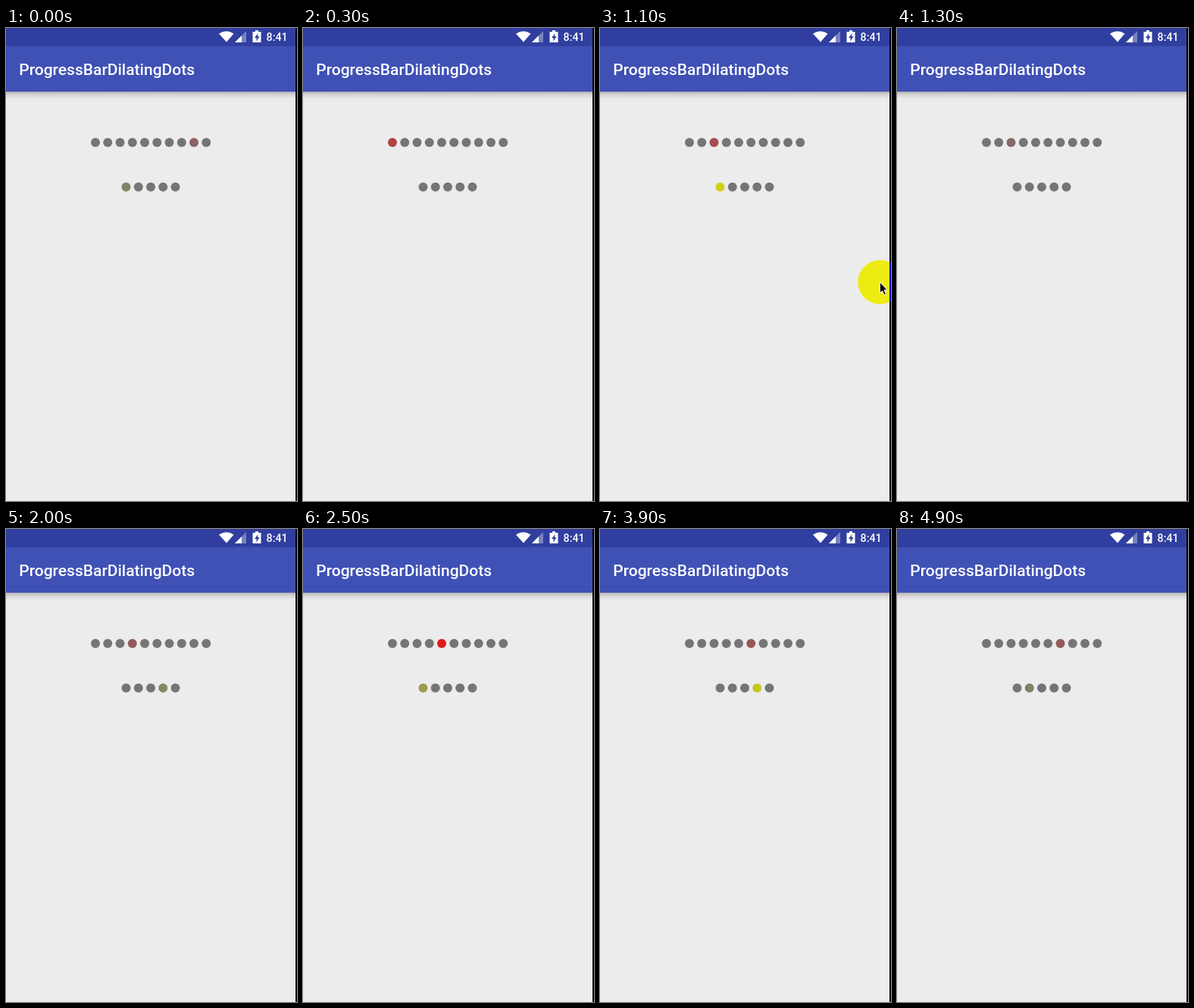
An HTML page that plays this animation: 384x624 px, repeating every 5000 ms.

```html
<!DOCTYPE html>
<html lang="en">
<head>
<meta charset="utf-8">
<title>Dilating dots</title>
<style>
  html, body { margin: 0; width: 100%; height: 100%; overflow: hidden; background: #ececec; }
  svg { display: block; }
  text { font-family: Roboto, sans-serif; font-weight: 500; fill: #fff; }
  #halo { mix-blend-mode: difference; }
</style>
</head>
<body>
<svg width="384" height="624" viewBox="0 0 384 624">
  <defs>
    <linearGradient id="shade" x2="0" y2="1">
      <stop offset="0" stop-opacity=".24"/>
      <stop offset=".4" stop-opacity=".1"/>
      <stop offset="1" stop-opacity="0"/>
    </linearGradient>
  </defs>
  <rect width="384" height="624" fill="#ececec"/>
  <rect y="84" width="384" height="10" fill="url(#shade)"/>
  <rect width="384" height="84" fill="#3f51b5"/>
  <rect width="384" height="24" fill="#303f9f"/>
  <text x="17.3" y="62" font-size="21">ProgressBarDilatingDots</text>
  <text x="343.6" y="17" font-size="14.2">8:41</text>
  <g fill="#fff">
    <path d="M281 7.5Q291 .8 300.5 7.5L291 18.5Z"/>
    <path d="M317 4V19H302Z" opacity=".35"/>
    <path d="M311 10V19H302Z"/>
    <path d="M329 3h4v2h3.5v14h-11V5H329Z"/>
  </g>
  <path d="M332.5 7L328 13h2.5v4.5l4-6.5h-2.5Z" fill="#303f9f"/>
  <g id="dots"></g>
  <rect x="382" width="2" height="624"/>
  <circle id="halo" r="29" fill="#00f"/>
  <path id="arrow" d="M0 0V14.5L3.3 11.5L5.8 17L8.2 16L5.8 10.5H10Z" stroke="#fff"/>
</svg>
<script>
const LOOP = 5, FPS = 10, GRAY = [117, 117, 117];
const $ = id => document.getElementById(id);

// place(t): whole part is the lit dot, fraction is how far it has faded.
const rows = [
  { count: 10, x: 118, y: 151, color: [255, 0, 0],
    // a quick start that settles to a steady pace
    place: t => 11.62 + 1.02 * t - 2.92 * Math.exp(-2.24 * t) },
  { count: 5, x: 158.5, y: 209.7, color: [232, 232, 0],
    // a steady pace with one lull
    place: t => 0.75 + 4 * t - 3.6 / (1 + Math.exp(-3.3 * (t - 3.31))) }
];

for (const row of rows) {
  row.dots = Array.from({ length: row.count }, (_, i) => {
    const dot = document.createElementNS("http://www.w3.org/2000/svg", "circle");
    dot.setAttribute("cx", row.x + i * 16.25);
    dot.setAttribute("cy", row.y);
    dot.setAttribute("r", 6);
    return $("dots").appendChild(dot);
  });
}

function drawRow({ dots, count, color, place }, t) {
  const p = place(t), lit = Math.floor(p);
  const glow = (1 - p + lit) ** 1.5;
  dots.forEach((dot, i) => {
    const tint = i === lit % count ? glow : 0;
    const rgb = GRAY.map((g, c) => Math.round(g + (color[c] - g) * tint));
    dot.setAttribute("fill", `rgb(${rgb})`);
  });
}

// The pointer swings in at the right edge and drops away again.
function drawPointer(t) {
  const u = (t - 0.8) / 0.4;
  const x = 358 + 20 * u ** 2, y = 280 + 131 * u ** 3;
  for (const id of ["halo", "arrow"]) {
    $(id).setAttribute("visibility", t > 0.55 && t < 1.25 ? "visible" : "hidden");
    $(id).setAttribute("transform", `translate(${x} ${y})`);
  }
}

const origin = performance.now();
function draw() {
  const elapsed = (performance.now() - origin) / 1000 % LOOP;
  const t = Math.floor(elapsed * FPS) / FPS;
  rows.forEach(row => drawRow(row, t));
  drawPointer(t);
  requestAnimationFrame(draw);
}
draw();
</script>
</body>
</html>
```
